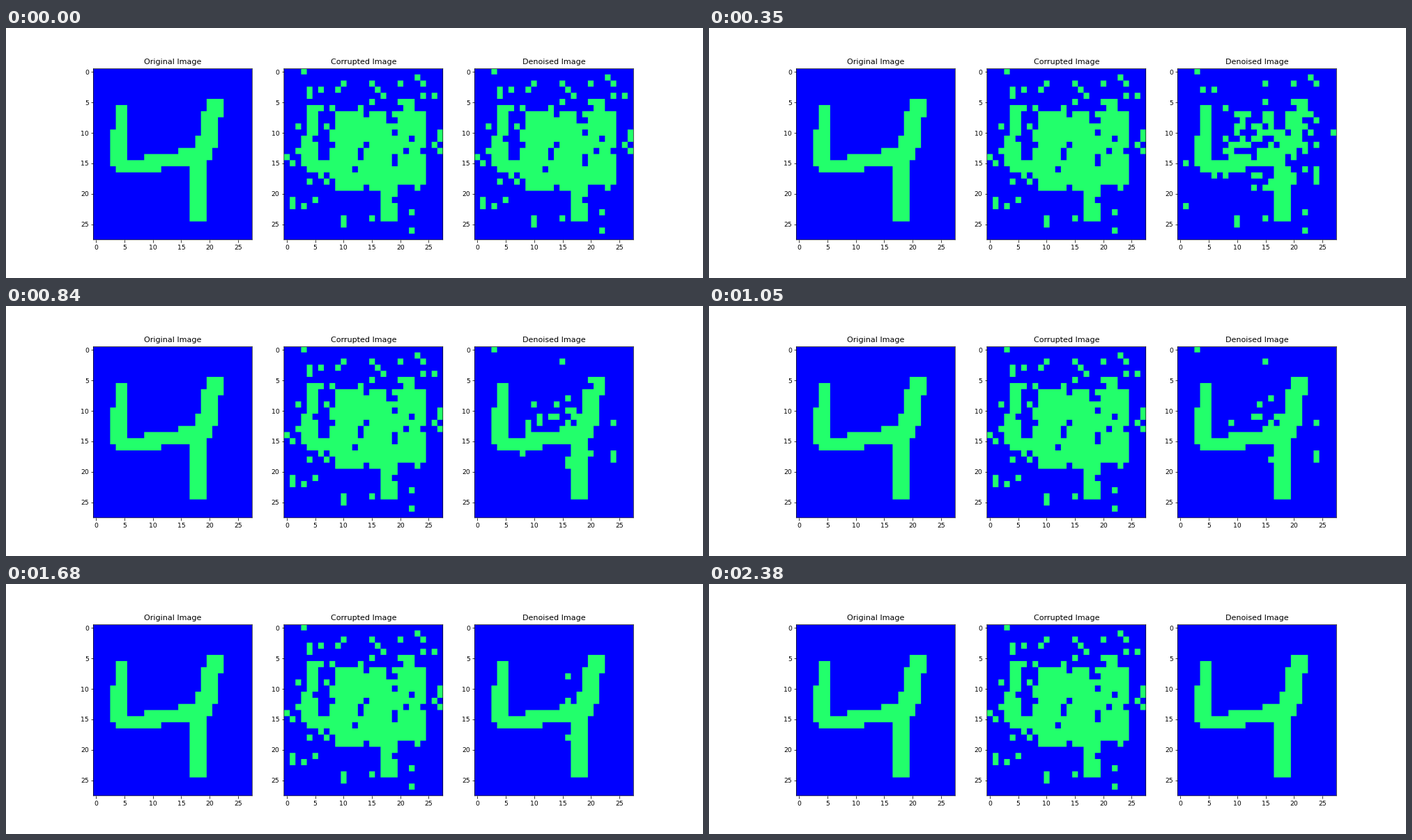
These frames come from a looping animation (1000 by 360 pixels, 3850 ms). A matplotlib script:

```python
import numpy as np
import matplotlib.pyplot as plt
from matplotlib.animation import FuncAnimation
from matplotlib.colors import LinearSegmentedColormap

N = 28
FRAMES, INTERVAL = 55, 70
LAST_FIX = 34  # frame in which the last wrong cell is corrected
COLORS = LinearSegmentedColormap.from_list("cells", ["#0000ff", "#22ff6b"])

# Rectangles of cells: first row, last row, first column, last column
DIGIT = [(6, 9, 4, 5), (10, 15, 3, 5), (15, 15, 6, 19), (16, 16, 4, 11),
         (14, 14, 9, 20), (13, 13, 15, 20), (11, 12, 18, 21),
         (7, 10, 19, 21), (5, 7, 20, 22), (16, 24, 17, 19)]
BLOCK = [(7, 8, 9, 17), (7, 8, 19, 24), (9, 18, 8, 24), (19, 19, 8, 19)]


def fill(grid, rects):
    for top, bottom, left, right in rects:
        grid[top:bottom + 1, left:right + 1] = 1


def corrupt(grid, rng):
    """Cover the middle with a block, then flip cells, more of them on top."""
    result = grid.copy()
    fill(result, BLOCK)
    chance = np.linspace(0.13, 0.05, N)[:, None]
    return result ^ (rng.random((N, N)) < chance)


def correction_frames(wrong, rng):
    """Wrong cells are corrected in random order at an exponential decay."""
    count = wrong.sum()
    left = (rng.permutation(count) + 0.5) / count
    when = np.zeros((N, N))
    when[wrong] = np.ceil(LAST_FIX * np.log(left) / np.log(0.5 / count))
    return when


rng = np.random.default_rng(4)
clean = np.zeros((N, N), int)
fill(clean, DIGIT)
noisy = corrupt(clean, rng)
when = correction_frames(clean != noisy, rng)


def enlarge(grid):
    """Give each cell many samples, so that its edges are smoothed evenly."""
    return np.kron(grid, np.ones((12, 12)))


plt.rcParams.update({"font.family": "DejaVu Sans", "axes.linewidth": 0.5})
fig = plt.figure(figsize=(10, 3.6), dpi=100, facecolor="white")
WIDTH, HEIGHT = 0.775 / 3.4, 0.68382


def panel(index, title, grid):
    ax = fig.add_axes([0.1253 + 1.2 * WIDTH * index, 0.15309, WIDTH, HEIGHT])
    image = ax.imshow(enlarge(grid), cmap=COLORS, vmin=0, vmax=1,
                      aspect="auto", interpolation="hanning",
                      extent=(-0.5, N - 0.5, N - 0.5, -0.5))
    ax.set_title(title, fontsize=8, pad=4.5)
    ax.set_xticks(range(0, N, 5))
    ax.set_yticks(range(0, N, 5))
    ax.tick_params(labelsize=6.667, width=0.533)
    ax.tick_params(axis="x", length=2.52, pad=2.52)
    ax.tick_params(axis="y", length=2.33, pad=2.33)
    for spine in ax.spines.values():
        spine.set_snap(False)
    return image


panel(0, "Original Image", clean)
panel(1, "Corrupted Image", noisy)
denoised = panel(2, "Denoised Image", noisy)


def update(frame):
    denoised.set_data(enlarge(np.where(when <= frame, clean, noisy)))
    return [denoised]


anim = FuncAnimation(fig, update, frames=FRAMES, interval=INTERVAL,
                     repeat=True, repeat_delay=0)
plt.show()
```
